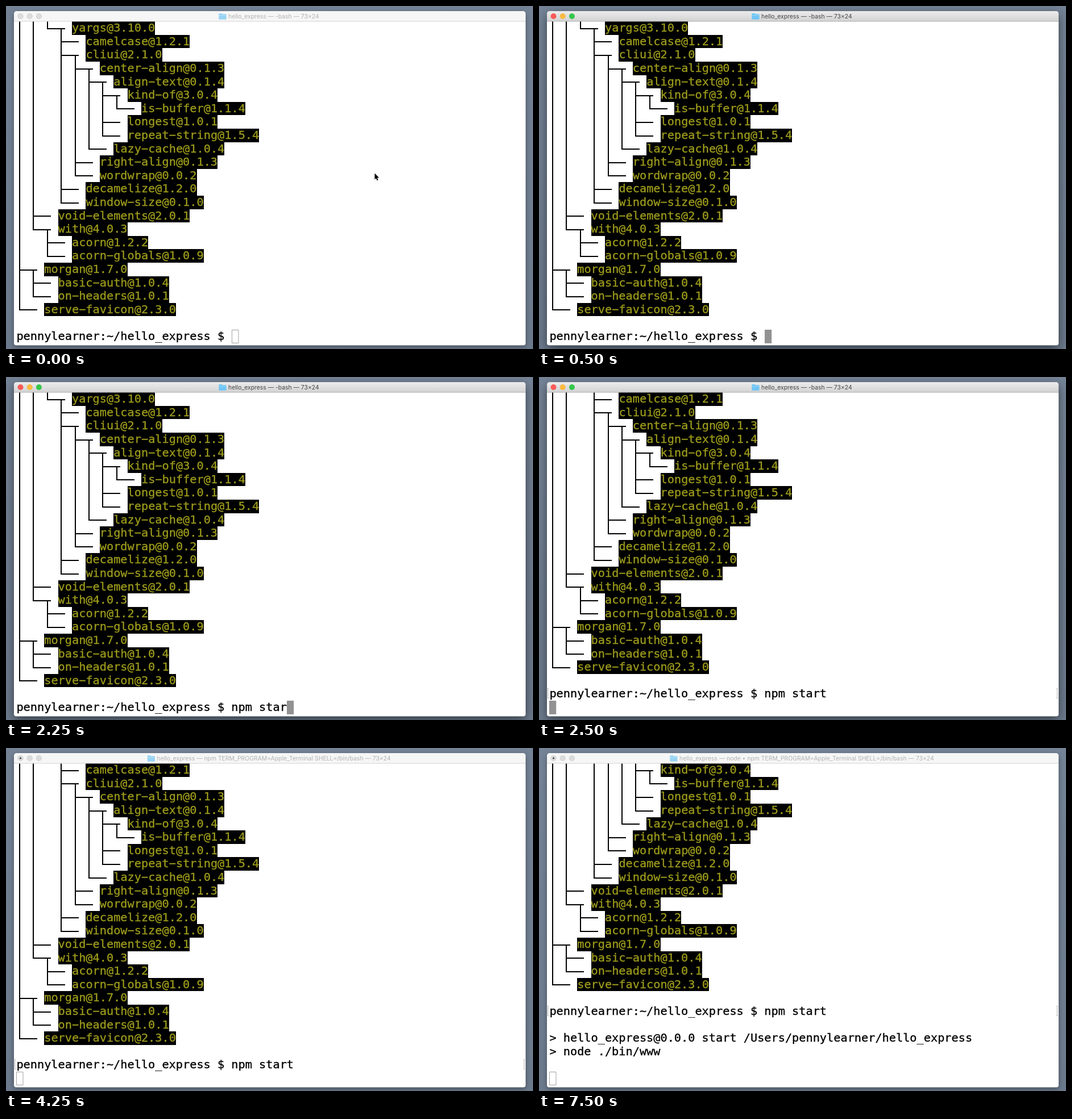
An HTML page with a canvas for the animation above (8 s loop, 927 by 604 pixels).

```html
<!DOCTYPE html>
<html lang="en">
<head>
<meta charset="utf-8">
<title>Terminal session</title>
<style>
html, body { margin: 0; width: 100%; height: 100%; overflow: hidden; background: #6f7d8f; }
canvas { display: block; width: 927px; height: 604px; }
</style>
</head>
<body>
<canvas id="stage" width="927" height="604"></canvas>
<script>
const ctx = document.getElementById('stage').getContext('2d');
const LOOP = 8000;
const WIN = { x: 14, y: 9, w: 900, h: 588.5 };
const CELL = { x: 18.4, y: 27.2, w: 12.2, h: 23.6, baseline: 18 };
const ROWS = 24;
const MONO = '20.26px "DejaVu Sans Mono", monospace';
const SANS = '10.38px Inter, sans-serif';

const PROMPT = 'pennylearner:~/hello_express $ ';
const TREE = `│ │ └─┬ yargs@3.10.0
│ │   ├── camelcase@1.2.1
│ │   ├─┬ cliui@2.1.0
│ │   │ ├─┬ center-align@0.1.3
│ │   │ │ ├─┬ align-text@0.1.4
│ │   │ │ │ ├─┬ kind-of@3.0.4
│ │   │ │ │ │ └── is-buffer@1.1.4
│ │   │ │ │ ├── longest@1.0.1
│ │   │ │ │ └── repeat-string@1.5.4
│ │   │ │ └── lazy-cache@1.0.4
│ │   │ ├── right-align@0.1.3
│ │   │ └── wordwrap@0.0.2
│ │   ├── decamelize@1.2.0
│ │   └── window-size@0.1.0
│ ├── void-elements@2.0.1
│ └─┬ with@4.0.3
│   ├── acorn@1.2.2
│   └── acorn-globals@1.0.9
├─┬ morgan@1.7.0
│ ├── basic-auth@1.0.4
│ └── on-headers@1.0.1
└── serve-favicon@2.3.0`.split('\n');
const OUTPUT = ['', '> hello_express@0.0.0 start /Users/pennylearner/hello_express', '> node ./bin/www', ''];

// Each list holds [start time, value]; the last started entry applies.
const TYPED = [[0, ''], [1250, 'n'], [1500, 'npm'], [1750, 'npm '], [2000, 'npm st'], [2250, 'npm star'], [2500, 'npm start']];
const ENV = 'npm TERM_PROGRAM=Apple_Terminal SHELL=/bin/bash';
const TITLES = [
  [0, { x: 391, job: '-bash' }],
  [2750, { x: 325, job: 'node /usr/local/bin/npm start' }],
  [3000, { x: 265.5, job: ENV }],
  [7250, { x: 254, job: 'sh • ' + ENV }],
  [7500, { x: 247, job: 'node • ' + ENV }]
];
const POINTER = [[0, { x: 648.5, y: 294.5 }], [250, { x: 610.5, y: 327 }], [500, null]];
const ENTERED = 2500, RUNNING = 2750, PRINTED = 7000;

const at = (steps, t) => steps.filter(([start]) => start <= t).pop()[1];
const colX = col => CELL.x + col * CELL.w;
const rowY = row => CELL.y + row * CELL.h;

function rect(x, y, w, h, color) {
  ctx.fillStyle = color;
  ctx.fillRect(x, y, w, h);
}

function disc(x, y, r, color) {
  ctx.fillStyle = color;
  ctx.beginPath();
  ctx.arc(x, y, r, 0, Math.PI * 2);
  ctx.fill();
}

function gradient(y0, y1, from, to) {
  const fill = ctx.createLinearGradient(0, y0, 0, y1);
  fill.addColorStop(0, from);
  fill.addColorStop(1, to);
  return fill;
}

function windowPath() {
  ctx.beginPath();
  ctx.roundRect(WIN.x, WIN.y, WIN.w, WIN.h, [5, 5, 4, 4]);
}

function drawFrame(active) {
  rect(0, 0, 927, 604, gradient(0, 604, '#748396', '#6c7a8d'));
  ctx.save();
  ctx.shadowColor = active ? 'rgba(0,0,0,.5)' : 'rgba(0,0,0,.35)';
  ctx.shadowBlur = active ? 18 : 10;
  ctx.shadowOffsetY = active ? 6 : 3;
  ctx.fillStyle = '#fff';
  windowPath();
  ctx.fill();
  ctx.restore();
}

function drawFolder(x, color) {
  ctx.fillStyle = color;
  ctx.beginPath();
  ctx.roundRect(x, 13, 6, 4, 1);
  ctx.roundRect(x, 14.3, 13.3, 9.4, 1);
  ctx.fill();
  rect(x, 16, 13.3, 0.7, 'rgba(255,255,255,.4)');
}

function drawTitleBar(t, active) {
  const running = t >= RUNNING;
  rect(WIN.x, WIN.y, WIN.w, 18, active ? gradient(9, 27, '#ececec', '#d2d2d2') : '#f6f6f6');
  rect(WIN.x, 26.5, WIN.w, 1, active ? '#b0b0b0' : '#d4d4d4');
  ['#fc5b57', '#fdbb40', '#34c84a'].forEach((color, i) => {
    const x = 25.5 + i * 16.2;
    disc(x, 18, 5.1, active ? 'rgba(0,0,0,.15)' : '#c9c9c9');
    disc(x, 18, active ? 4.9 : 4.5, active ? color : '#dcdcdc');
  });
  if (running) disc(25.5, 18, 1.7, active ? '#5b0b08' : '#555');

  const title = at(TITLES, t);
  drawFolder(title.x - 16.7, !active ? '#98d4f2' : running ? '#a6daf6' : '#6fc6f5');
  ctx.font = SANS;
  ctx.fillStyle = active ? '#444' : '#b2b2b2';
  ctx.fillText(`hello_express — ${title.job} — 73×24`, title.x, 22);
}

function drawBranch(char, col, row) {
  const line = 2;
  const left = Math.round(colX(col)), right = Math.round(colX(col + 1));
  const top = Math.round(rowY(row)), bottom = Math.round(rowY(row + 1));
  const x = Math.floor(colX(col) + CELL.w / 2 - line / 2);
  const y = Math.floor(rowY(row) + CELL.h / 2 + 0.2);
  if ('│├└'.includes(char)) rect(x, top, line, y + line - top, '#000');
  if ('│├┬'.includes(char)) rect(x, y, line, bottom - y, '#000');
  if ('├└'.includes(char)) rect(x, y, right - x, line, '#000');
  if (char === '─') rect(left, y, right - left, line, '#000');
  if (char === '┬') rect(left, y, right - left, line, '#000');
}

// The thin stroke gives the heavier look of smoothed terminal text.
function drawText(text, col, row, color) {
  const x = colX(col), y = rowY(row) + CELL.baseline;
  const wideHyphens = text.replaceAll('-', '−');
  ctx.font = MONO;
  ctx.fillStyle = ctx.strokeStyle = color;
  ctx.lineWidth = 0.35;
  ctx.fillText(wideHyphens, x, y);
  ctx.strokeText(wideHyphens, x, y);
}

function drawPackage(line, row) {
  const start = line.search(/[a-z]/);
  [...line.slice(0, start)].forEach((char, col) => drawBranch(char, col, row));
  const left = Math.round(colX(start)), right = Math.round(colX(line.length));
  const top = Math.round(rowY(row)), bottom = Math.round(rowY(row + 1));
  rect(left, top, right - left, bottom - top, '#000');
  drawText(line.slice(start), start, row, '#9c9b1c');
}

function drawMarks(row) {
  const y = Math.round(rowY(row)) + 2;
  for (const [x, tick] of [[15, 15], [911, 910]]) {
    rect(x, y, 1, 18, '#b4b4b4');
    rect(tick, y, 2, 1, '#b4b4b4');
    rect(tick, y + 17, 2, 1, '#b4b4b4');
  }
}

function drawCaret(col, active) {
  const x = Math.round(colX(col)), y = 570;
  if (active) return rect(x, y, 12.2, 24, '#929292');
  ctx.strokeStyle = '#a2a2a2';
  ctx.lineWidth = 1;
  ctx.strokeRect(x + 0.5, y + 0.5, 11.5, 23);
}

function drawPointer({ x, y }) {
  ctx.beginPath();
  [[0, 0], [0, 11], [2.5, 8.7], [4.2, 12.8], [6.1, 12], [4.4, 8.1], [7.8, 8]]
    .forEach(([dx, dy]) => ctx.lineTo(x + dx, y + dy));
  ctx.closePath();
  ctx.lineJoin = 'round';
  ctx.lineWidth = 1.6;
  ctx.strokeStyle = '#fff';
  ctx.stroke();
  ctx.fillStyle = '#000';
  ctx.fill();
}

function drawScreen(t, active) {
  const typed = PROMPT + at(TYPED, t);
  const entered = t >= ENTERED;
  const after = entered ? [...(t >= PRINTED ? OUTPUT : []), ''] : [];
  const lines = [...TREE, '', typed, ...after];
  const scroll = lines.length - ROWS;

  lines.slice(scroll).forEach((line, row) => {
    if (row + scroll < TREE.length) drawPackage(line, row);
    else drawText(line, 0, row, '#000');
  });
  if (entered) drawMarks(TREE.length + 1 - scroll);
  drawCaret(entered ? 0 : typed.length, active);
}

function render(t) {
  const active = t >= 500 && t < 4250;
  drawFrame(active);
  ctx.save();
  windowPath();
  ctx.clip();
  drawScreen(t, active);
  drawTitleBar(t, active);
  ctx.restore();
  const pointer = at(POINTER, t);
  if (pointer) drawPointer(pointer);
}

const begin = performance.now();
function tick() {
  render((performance.now() - begin) % LOOP);
  requestAnimationFrame(tick);
}
tick();
</script>
</body>
</html>
```
